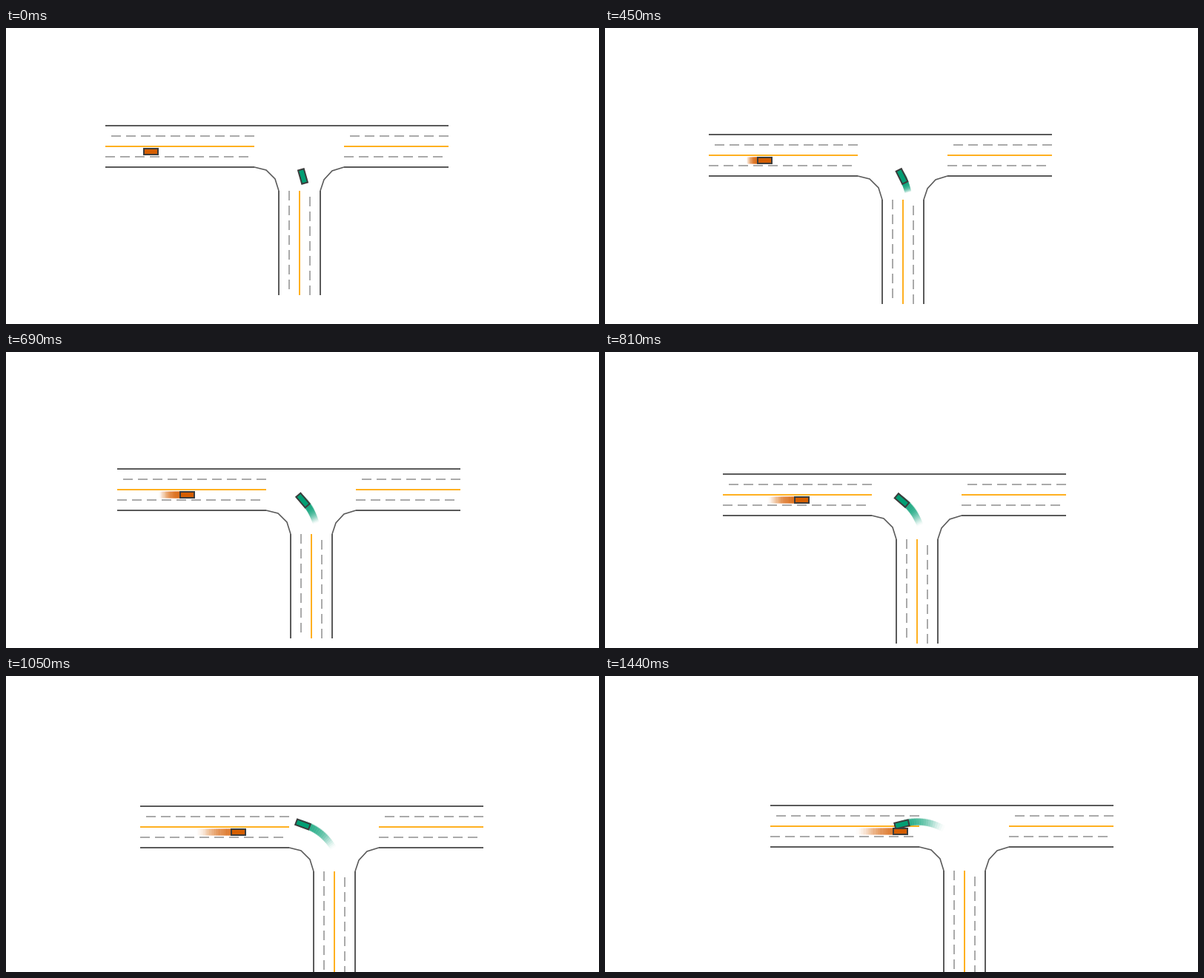
An HTML page with a canvas for the animation above (1470 ms loop, 800 px wide and 400 px high).

```html
<!DOCTYPE html>
<html lang="en">
<head>
<meta charset="utf-8">
<title>T-junction</title>
<style>
  html, body { margin: 0; width: 100%; height: 100%; overflow: hidden; background: #fff; }
  canvas { display: block; }
</style>
</head>
<body>
<canvas id="stage" width="800" height="400"></canvas>
<script>
const ctx = document.getElementById('stage').getContext('2d');
const STEP = 30, STEPS = 49, TRAIL = 15;
const EDGE = '#5a5a5a', DASH = '#aaaaaa', YELLOW = '#ffb020', OUTLINE = '#3c3c3c';
const GREEN = '#009e73', ORANGE = '#d55e00';

// Distance driven: constant acceleration up to a top speed.
function travel(n, accel, top) {
  const v0 = 0.1, cap = (top - v0) / accel, m = Math.min(n, cap);
  return v0 * m + accel * m * m / 2 + top * Math.max(0, n - cap);
}

// The green car turns left on a circular arc.
const BEND = 0.0141, START = 20 * Math.PI / 180, SLIP = 4.2 * Math.PI / 180;
function turn(n) {
  const a = START + BEND * travel(n, 0.1055, 3.23);
  return {
    x: (Math.cos(START) - Math.cos(a)) / BEND,
    y: (Math.sin(a) - Math.sin(START)) / BEND,
    angle: Math.PI / 2 - (a - SLIP)
  };
}

function poly(color, width, ...p) {
  ctx.strokeStyle = color;
  ctx.lineWidth = width;
  ctx.beginPath();
  for (let i = 0; i < p.length; i += 2) ctx.lineTo(p[i], p[i + 1]);
  ctx.stroke();
}

function line(color, x1, y1, x2, y2) {
  poly(color, 2, x1, y1, x2, y2);
}

function dashes(x, y, count, vertical) {
  for (let i = 0; i < count; i++) {
    const d = 20 * i;
    if (vertical) line(DASH, x, y + d, x, y + d + 13);
    else line(DASH, x + d, y, x + d + 13, y);
  }
}

function road() {
  line(EDGE, 0, 0, 463, 0);
  dashes(8, 14, 10);
  dashes(330, 14, 7);
  dashes(0, 42, 10);
  dashes(322, 42, 7);
  for (const [y, color] of [[28, YELLOW], [56, EDGE]]) {
    line(color, 0, y, 201, y);
    line(color, 322, y, 463, y);
  }
  for (const [x, color] of [[234, EDGE], [262, YELLOW], [290, EDGE]]) line(color, x, 88, x, 229);
  dashes(248, 88, 7, true);
  dashes(276, 96, 7, true);
  poly(EDGE, 1.6, 201, 56, 217, 60, 229, 72, 234, 88);
  poly(EDGE, 1.6, 290, 88, 295, 73, 306, 61, 322, 56);
}

function car(x, y, angle, color, alpha) {
  ctx.save();
  ctx.translate(x, y);
  ctx.rotate(angle);
  ctx.fillStyle = color;
  if (alpha) {
    ctx.globalAlpha = alpha;
    ctx.fillRect(-10, -4.5, 20, 9);
  } else {
    ctx.fillRect(-9.5, -4, 19, 8);
    ctx.strokeStyle = OUTLINE;
    ctx.lineWidth = 2;
    ctx.strokeRect(-9.5, -4, 19, 8);
  }
  ctx.restore();
}

function draw(n) {
  const now = turn(n);
  const ox = Math.round(134.34 + now.x), oy = Math.round(132.14 + now.y);

  const green = (k, alpha) => {
    const p = turn(k);
    car(400.5 + now.x - p.x, 200.5 + now.y - p.y, p.angle, GREEN, alpha);
  };
  const orange = (k, alpha) =>
    car(ox + 61.5 + Math.round(travel(k, 0.115, 3.3)), oy + 35, 0, ORANGE, alpha);

  ctx.fillStyle = '#fff';
  ctx.fillRect(0, 0, 800, 400);
  ctx.save();
  ctx.translate(ox, oy);
  road();
  ctx.restore();

  for (const vehicle of [green, orange]) {
    for (let age = Math.min(TRAIL, n); age > 0; age--) {
      vehicle(n - age, 0.3 * (1 - age / (TRAIL + 1)));
    }
    vehicle(n);
  }
}

const begin = performance.now();
function tick() {
  const n = Math.floor((performance.now() - begin) / STEP) % STEPS;
  draw(n < 2 ? 0 : n);
  requestAnimationFrame(tick);
}
tick();
</script>
</body>
</html>
```
